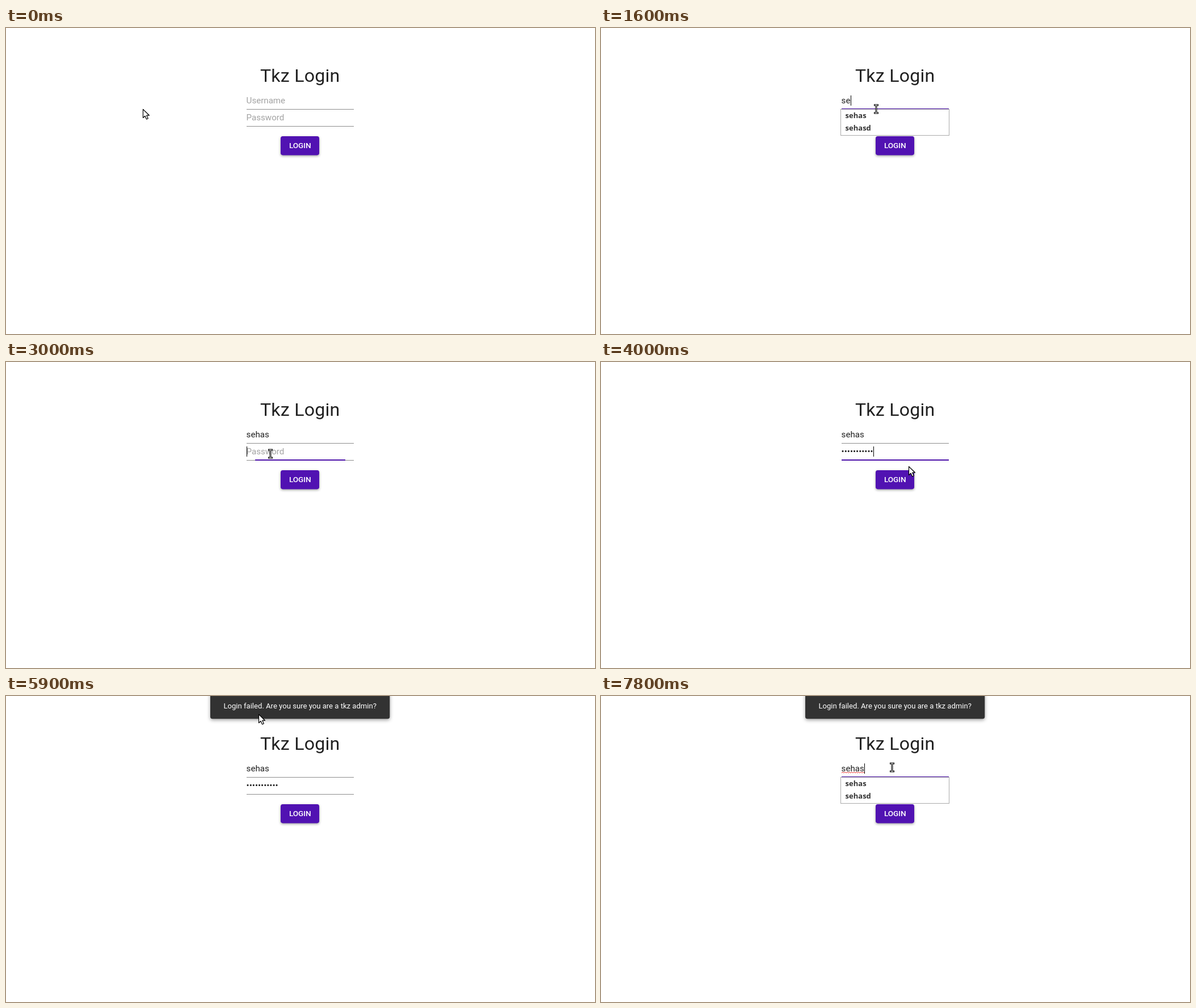
Animation, 1038 px wide and 540 px high, one loop 8 s. Source, as an HTML page with a canvas:

```html
<!DOCTYPE html>
<html lang="en">
<head>
<meta charset="utf-8">
<title>Login</title>
<style>
html, body { margin: 0; width: 100%; height: 100%; overflow: hidden; background: #fff; }
canvas { display: block; }
</style>
</head>
<body>
<canvas id="stage" width="1038" height="540"></canvas>
<script>
const ctx = document.getElementById('stage').getContext('2d');
const LOOP = 8000, TICK = 100;
const LEFT = 424, WIDTH = 189, MIDDLE = 518.2;
const INK = '#212121', PURPLE = '#4a0fa8';
const BODY = '15.1px Roboto, sans-serif';
const USER = 'sehas';
const SUGGESTIONS = [USER, 'sehasd', 'sedah', 'sanhed', 'sdehas', 'snahed'];

// Pointer glides: start, end, x and y reached
const GLIDES = [
  [200, 1000, 496, 138], [1100, 2000, 477, 143], [2100, 2400, 368, 193], [2600, 2800, 466, 162],
  [3000, 3300, 527, 166], [3400, 4000, 542, 184], [4100, 4200, 515, 204], [5200, 5800, 398, 45],
  [5800, 5900, 445, 32], [6000, 6400, 496, 23], [6500, 6700, 464, 22], [6800, 7200, 513, 126]
];

const clamp = v => Math.max(0, Math.min(1, v));
const progress = (t, from, to) => clamp((t - from) / (to - from));
const easeOut = p => 1 - (1 - p) ** 2.65;
const smooth = p => p * p * (3 - 2 * p);
const typed = (t, start, pace, length) => Math.floor(clamp(((t - start) / pace + 1) / length) * length + 1e-6);
const listOpen = t => (t >= 1400 && t < 2400) || t >= 7400;

// Each glide dips a little, in proportion to its width
function pointerAt(t) {
  let x = 241, y = 143;
  for (const [from, to, nextX, nextY] of GLIDES) {
    if (t < from) break;
    const p = progress(t, from, to), dx = nextX - x;
    x += dx * p;
    y += (nextY - y) * p + Math.abs(dx) * .12 * Math.sin(Math.PI * p);
  }
  return [Math.round(x), Math.round(y)];
}

function target(t) {
  const [x, y] = pointerAt(t);
  if (x >= LEFT && x <= LEFT + WIDTH) {
    if (y >= 115 && y < 144) return 'user';
    if (y >= 144 && y <= 174 && !listOpen(t)) return 'pass';
  }
  if (x >= 484 && x <= 552 && y >= 191 && y <= 224) return 'button';
  if (t > 4900 && y < 27 && x > 383 && x < 653) return 'message';
  return '';
}

function text(str, x, y, font, color, align = 'left', spacing = 0) {
  ctx.font = font;
  ctx.fillStyle = color;
  ctx.textAlign = align;
  ctx.letterSpacing = spacing + 'px';
  ctx.fillText(str, x, y);
}

function box(x, y, w, h, color, shadow) {
  ctx.save();
  ctx.shadowColor = 'rgba(0,0,0,.38)';
  ctx.shadowBlur = shadow;
  ctx.shadowOffsetY = shadow / 2.5;
  ctx.fillStyle = color;
  ctx.beginPath();
  ctx.roundRect(x, y, w, h, 3.8);
  ctx.fill();
  ctx.restore();
}

function line(y, h, color, scale = 1) {
  ctx.fillStyle = color;
  ctx.fillRect(LEFT + WIDTH * (1 - scale) / 2, y, WIDTH * scale, h);
}

function field(t, name, value, hint, bottom, spans) {
  const over = target(t) === name, was = target(t - TICK) === name;
  const span = spans.find(([from, to]) => t >= from && t < to + 200);
  const focused = span && t < span[1];

  line(bottom - 1, 1, '#8c8c8c');
  if (span) {
    const grow = from => easeOut(progress(t, from - 100, from + 100));
    line(bottom - 2, 2, PURPLE, focused ? grow(span[0]) : 1 - grow(span[1]));
  } else if (over) line(bottom - 2, 2, was ? '#333' : '#888');
  else if (was) line(bottom - 1, 1, '#444');

  text(value || hint, LEFT - .4, bottom - 11, BODY, value ? INK : '#a2a2a2');
  if (focused) {
    ctx.fillStyle = '#000';
    ctx.fillRect(LEFT + Math.round(value && ctx.measureText(value).width), bottom - 25, 1, 18);
  }
}

function squiggle(x, y, width) {
  ctx.beginPath();
  for (let i = 0; i <= width; i += 2) ctx.lineTo(x + i, y + (i % 4 ? -1 : 1));
  ctx.strokeStyle = '#e53935';
  ctx.lineWidth = 1;
  ctx.stroke();
}

function suggestions(rows) {
  const height = rows * 22.5 + 1;
  ctx.fillStyle = '#fff';
  ctx.fillRect(422, 143, 192, height);
  ctx.strokeStyle = '#aaa';
  ctx.lineWidth = 1;
  ctx.strokeRect(422.5, 143.5, 191, height);
  SUGGESTIONS.slice(0, rows).forEach((name, i) =>
    text(name, 430.6, Math.floor(159 + i * 22.5), 'bold 13px "Noto Sans", sans-serif', '#333'));
}

const ARROW = new Path2D('M.5.5V15.5L4 12.2 6.6 18 9.3 16.8 6.8 11.2H11.5Z');
const HAND = new Path2D('M-2 0H2V5L9 7V11L7 14.5H-3L-7 9V7H-2Z');
const BEAM = new Path2D('M-2.5-7H2.5M-2.5 7H2.5M0-7V7');

function pointer(t) {
  const kind = target(t);
  ctx.save();
  ctx.translate(...pointerAt(t));
  if (kind && kind !== 'button') {
    ctx.lineCap = 'square';
    for (const [width, color] of [[3, '#000'], [1, '#ddd']]) {
      ctx.lineWidth = width;
      ctx.strokeStyle = color;
      ctx.stroke(BEAM);
    }
  } else {
    const shape = kind ? HAND : ARROW;
    ctx.lineJoin = 'round';
    ctx.lineWidth = 1.2;
    ctx.fillStyle = '#fff';
    ctx.strokeStyle = '#000';
    ctx.fill(shape);
    ctx.stroke(shape);
  }
  ctx.restore();
}

function button(t) {
  const hover = progress(t, 4100, 4300) - progress(t, 5200, 5500);
  const pressed = t >= 4500 && t < 4800;
  const mix = (a, b) => Math.round(a + (b - a) * hover);
  const color = `rgb(${mix(81, 68)},${mix(18, 0)},${mix(178, 156)})`;
  box(484, 191, 68, 33.4, color, pressed ? 8 : 4 + hover * 2);
  text('LOGIN', MIDDLE, 212, '500 13.6px Roboto, sans-serif', '#fff', 'center', -.1);
}

function toast(t) {
  const y = 49 * (smooth(progress(t, 4600, 5000)) - 1);
  box(360, y - 6, 316.3, 46.2, '#323232', 6);
  text('Login failed. Are you sure you are a tkz admin?', MIDDLE, y + 22,
    '13.1px Roboto, sans-serif', '#fff', 'center');
}

function draw(t) {
  ctx.fillStyle = '#fff';
  ctx.fillRect(0, 0, 1038, 540);
  text('Tkz Login', MIDDLE, 95, '32.1px Roboto, sans-serif', INK, 'center', .236);

  const user = USER.slice(0, typed(t, 1400, 150, USER.length));
  const pass = '•'.repeat(typed(t, 3200, 80, 11));
  field(t, 'user', user, 'Username', 144, [[1200, 2700], [7200, LOOP]]);
  field(t, 'pass', pass, 'Password', 174, [[3000, 4400]]);
  if (t >= 7400) squiggle(LEFT, 135, 40);

  button(t);
  if (listOpen(t)) suggestions(t < 1600 ? 6 : 2);
  if (t >= 4700) toast(t);
  pointer(t);
}

function tick() {
  draw(Math.floor(performance.now() % LOOP / TICK) * TICK);
  requestAnimationFrame(tick);
}
tick();
</script>
</body>
</html>
```
